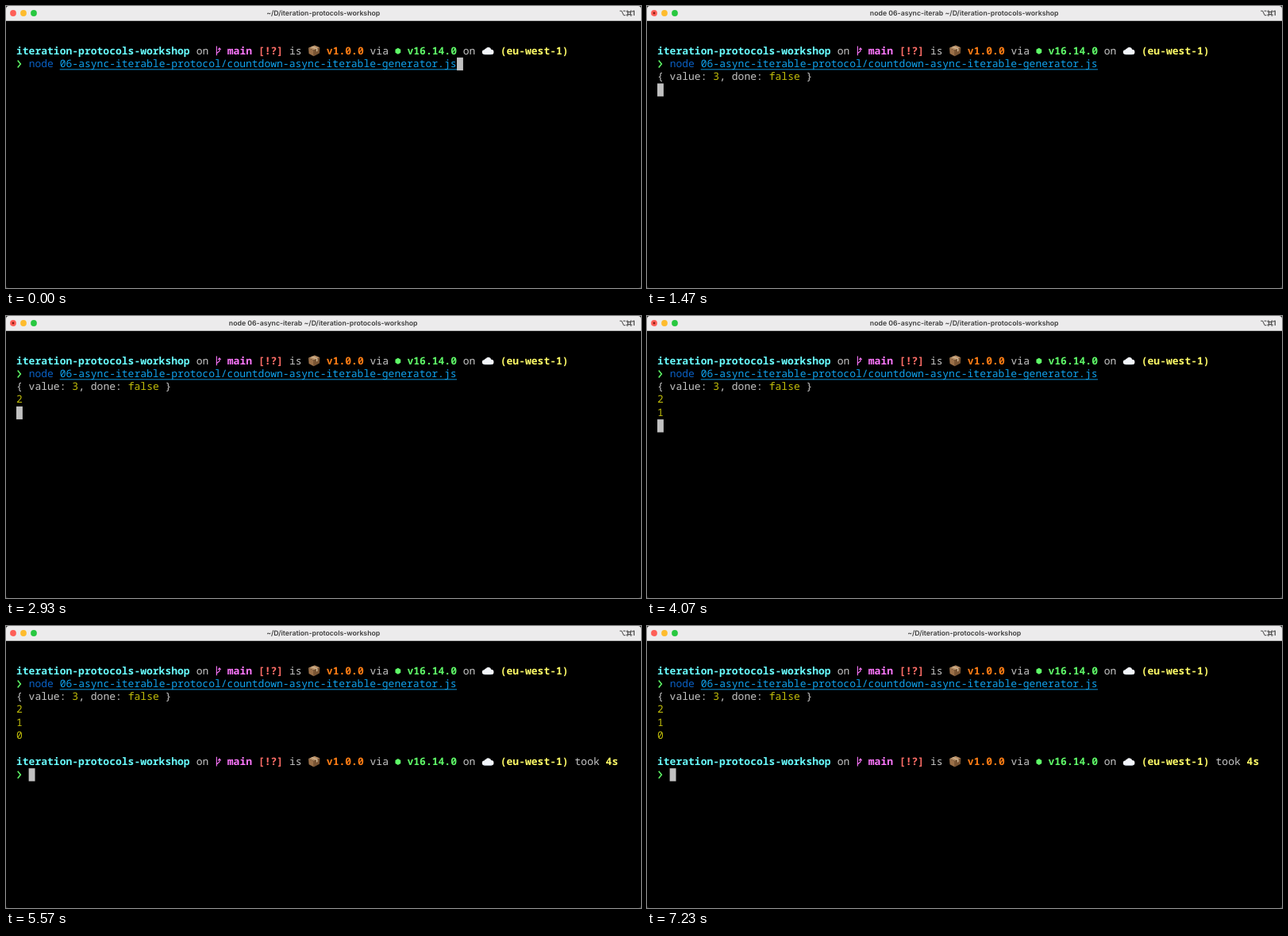
Recreate the animation shown at these times as an HTML page. Size 800 by 355 pixels, loop 7.26 s.

```html
<!DOCTYPE html>
<html lang="en">
<head>
<meta charset="utf-8">
<title>Terminal</title>
<style>
  html, body { margin: 0; width: 100%; height: 100%; overflow: hidden; background: #262626; }
  svg { display: block; width: 800px; height: 355px; }
  text { white-space: pre; text-rendering: geometricPrecision; font-variant-ligatures: none; }
  .mono { font: 13.028px "Noto Sans Mono", "DejaVu Sans Mono", monospace; }
  .bold { font-weight: 700; }
  .title { font: 600 8.72px Inter, Roboto, sans-serif; fill: #3c3c3c; }
</style>
</head>
<body>
<svg id="stage" viewBox="0 0 800 355">
  <rect width="800" height="355" rx="4"/>
  <path d="M0 18.5V3.5Q0 0 3.5 0H796.5Q800 0 800 3.5V18.5Z" fill="#ecebec"/>
  <rect y="18" width="800" height=".7" fill="#cfcfcf"/>
  <circle cx="9" cy="9" r="3.9" fill="#fe5f57"/>
  <circle cx="22" cy="9" r="3.9" fill="#febc2e"/>
  <circle cx="35" cy="9" r="3.9" fill="#28c840"/>
  <circle id="busy" cx="9" cy="9" r="1.4" fill="#8a1a12"/>
  <text id="title" class="title" x="399.7" y="12" text-anchor="middle"></text>
  <g fill="none" stroke="#3c3c3c" stroke-width=".95">
    <path d="M773.3 6.2H775.6L778.2 11.7H780.4M777.6 6.2H780.4"/>
    <path d="M783.6 7.6H786.6V10.6H783.6Z"/>
    <circle cx="782.8" cy="6.8" r=".95"/>
    <circle cx="787.4" cy="6.8" r=".95"/>
    <circle cx="782.8" cy="11.4" r=".95"/>
    <circle cx="787.4" cy="11.4" r=".95"/>
  </g>
  <text class="title" x="788.8" y="12">1</text>
  <g id="screen"></g>
  <rect id="cursor" width="7.9" height="16.3" fill="#c1c1c1"/>
</svg>
<script>
const LOOP = 7260;
const CELL = 7.817, ROW = 16.33, LEFT = 13, TOP = 48.5, BASE = 12;

const GRAY = "#c7c7c7", CYAN = "#68fdff", PINK = "#ff77ff", RED = "#ff6d67",
      ORANGE = "#ff7d14", GREEN = "#5ffa68", YELLOW = "#fffc67", OLIVE = "#c2be0a",
      NAVY = "#0a60c4", SKY = "#0fa2ee";

// Moments of the run
const ENTER = 90, THREE = 1140, TWO = 2140, ONE = 3140, ZERO = 4150, PROMPT = 4250;
// The busy dot follows the process late
const BUSY_ON = 1000, BUSY_OFF = 5050;

const DIR = "~/D/iteration-protocols-workshop";
const FILE = "06-async-iterable-protocol/countdown-async-iterable-generator.js";

const colX = col => LEFT + col * CELL;
const rowY = row => TOP + row * ROW;
const byId = id => document.getElementById(id);

function add(parent, tag, attrs, content) {
  const el = document.createElementNS("http://www.w3.org/2000/svg", tag);
  for (const key in attrs) el.setAttribute(key, attrs[key]);
  if (content) el.textContent = content;
  parent.append(el);
  return el;
}

const blocks = [];
function block(from) {
  const el = add(byId("screen"), "g", {});
  blocks.push({ el, from });
  return el;
}

function write(g, row, col, content, fill, bold) {
  add(g, "text", {
    x: colX(col), y: rowY(row) + BASE, fill, class: bold ? "mono bold" : "mono"
  }, content);
}

// Icons are drawn relative to the top left of their cell
const icons = {
  branch(g) {
    add(g, "path", {
      d: "M2.2 2V13.8M2.2 11.2L5.8 8.2V4.6M4.1 6.5L5.8 4.4L7.5 6.5",
      fill: "none", stroke: PINK, "stroke-width": 1.1
    });
  },
  box(g) {
    add(g, "path", { d: "M.6 4.2L8.4 1L15 3.8L7.4 7.2Z", fill: "#b98f66" });
    add(g, "path", { d: "M.6 4.2L7.4 7.2V14.8L1.2 11.4Z", fill: "#9a7048" });
    add(g, "path", { d: "M15 3.8L7.4 7.2V14.8L14.5 11Z", fill: "#795433" });
    add(g, "path", { d: "M3.9 2.9L5.4 2.3L12.1 5.1V8.2L10.6 8.9V5.8Z", fill: "#d3bb98" });
  },
  hex(g) {
    add(g, "path", { d: "M4 4.2L7.4 6.2V10.2L4 12.2L.6 10.2V6.2Z", fill: GREEN });
  },
  cloud(g) {
    add(g, "path", {
      d: "M3.6 12.6A2.9 2.9 0 0 1 3.3 6.8A2.6 2.6 0 0 1 5.4 5A3.8 3.8 0 0 1 12 6.2A3.2 3.2 0 0 1 12 12.6Z",
      fill: "#f2f5fa"
    });
    add(g, "path", { d: "M2.4 11.8Q8 12.8 13.6 11.6L12 12.7H3.6Z", fill: "#c9d5e4" });
  },
  arrow(g) {
    add(g, "path", {
      d: "M1.7 3.6L5.4 8.1L1.7 12.6", fill: "none", stroke: GREEN, "stroke-width": 1.5
    });
  }
};

function icon(g, row, col, name) {
  icons[name](add(g, "g", { transform: `translate(${colX(col)} ${rowY(row)})` }));
}

function prompt(g, row) {
  write(g, row, 0, "iteration-protocols-workshop", CYAN, true);
  write(g, row, 29, "on", GRAY);
  icon(g, row, 32, "branch");
  write(g, row, 34, "main", PINK, true);
  write(g, row, 39, "[!?]", RED, true);
  write(g, row, 44, "is", GRAY);
  icon(g, row, 47, "box");
  write(g, row, 50, "v1.0.0", ORANGE, true);
  write(g, row, 57, "via", GRAY);
  icon(g, row, 61, "hex");
  write(g, row, 63, "v16.14.0", GREEN, true);
  write(g, row, 72, "on", GRAY);
  icon(g, row, 75, "cloud");
  write(g, row, 78, "(eu-west-1)", YELLOW, true);
  icon(g, row + 1, 0, "arrow");
}

const start = block(0);
prompt(start, 0);
write(start, 1, 2, "node", NAVY);
write(start, 1, 7, FILE, SKY);
add(start, "rect", {
  x: colX(7), y: rowY(1) + 14.6, width: FILE.length * CELL, height: 0.9, fill: SKY
});

const result = block(THREE);
write(result, 2, 0, "{ value:", GRAY);
write(result, 2, 9, "3", OLIVE);
write(result, 2, 10, ", done:", GRAY);
write(result, 2, 18, "false", OLIVE);
write(result, 2, 24, "}", GRAY);

[TWO, ONE, ZERO].forEach((from, i) => write(block(from), 3 + i, 0, String(2 - i), OLIVE));

const end = block(PROMPT);
prompt(end, 7);
write(end, 7, 90, "took", GRAY);
write(end, 7, 95, "4s", YELLOW, true);

// time, row, column
const cursorSteps = [
  [0, 1, 71], [ENTER, 2, 0], [THREE, 3, 0], [TWO, 4, 0],
  [ONE, 5, 0], [ZERO, 6, 0], [PROMPT, 8, 2]
];

const show = (el, on) => { el.style.display = on ? "" : "none"; };

function draw(t) {
  for (const { el, from } of blocks) show(el, t >= from);
  const [, row, col] = cursorSteps.filter(step => step[0] <= t).pop();
  byId("cursor").setAttribute("x", colX(col));
  byId("cursor").setAttribute("y", rowY(row));
  show(byId("busy"), t >= BUSY_ON && t < BUSY_OFF);
  const running = t >= ENTER && t < PROMPT;
  byId("title").textContent = (running ? "node 06-async-iterab " : "") + DIR;
}

const origin = performance.now();
function tick() {
  draw((performance.now() - origin) % LOOP);
  requestAnimationFrame(tick);
}
tick();
</script>
</body>
</html>
```
